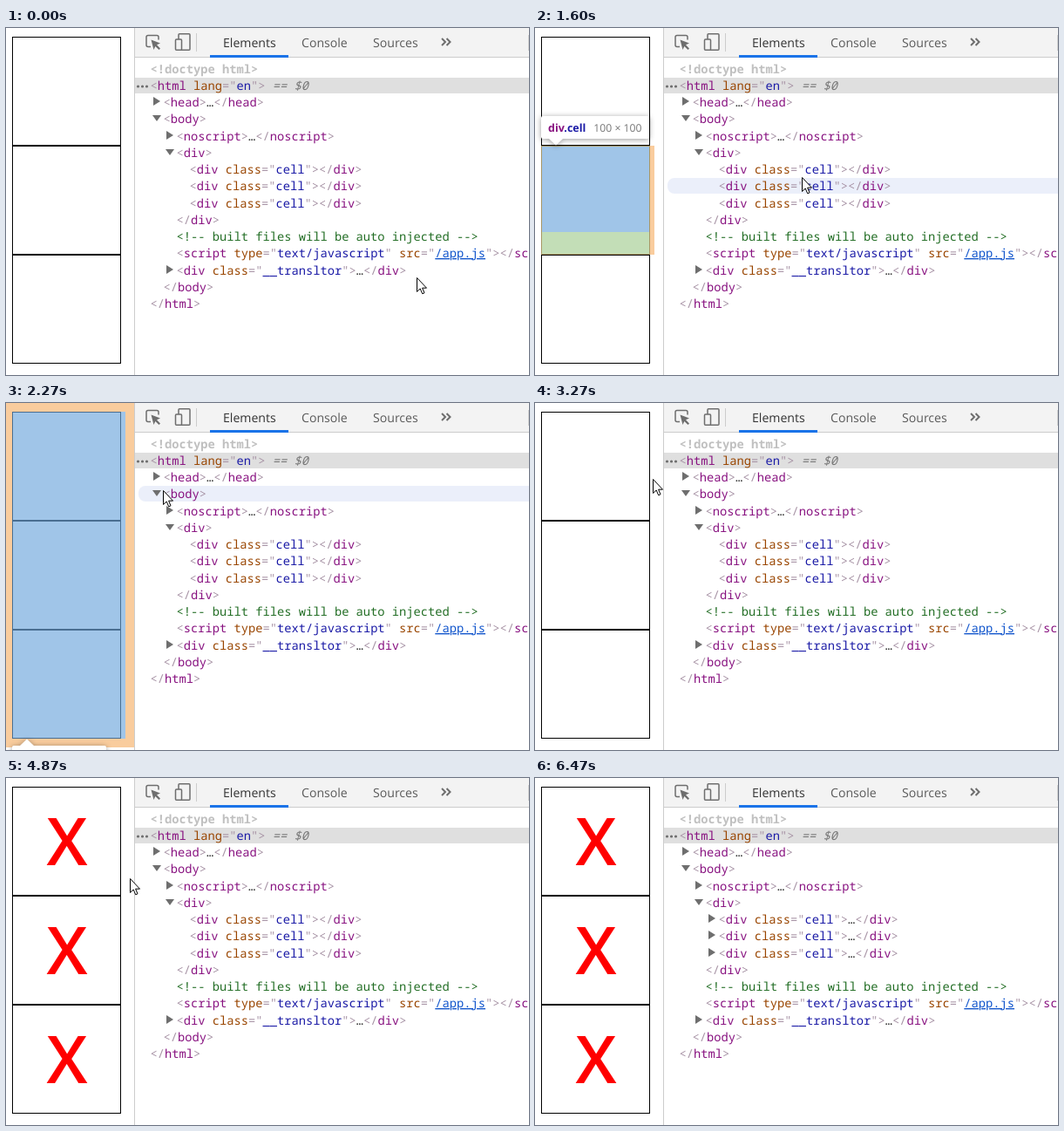
An HTML page that plays this animation: 600 by 398 pixels, repeating every 6670 ms.

```html
<!DOCTYPE html>
<html lang="en">
<head>
<meta charset="utf-8">
<title>Element inspector</title>
<style>
html, body { margin: 0; width: 100%; height: 100%; overflow: hidden; background: #fff; }
svg { display: block; width: 600px; height: 398px; }
text { white-space: pre; text-rendering: geometricPrecision; }
.code { font: 13.745px "Noto Sans Mono", monospace; fill: #a894a6; }
.doctype { fill: #c0c0c0; font-weight: 600; }
.tag { fill: #881280; }
.attr { fill: #994500; }
.val { fill: #1a1aa6; }
.dots { fill: #333; }
.note { fill: #236e25; }
.link { fill: #1155cc; text-decoration: underline; }
.ref { fill: #777; font-style: italic; }
.tab { font: 14.1px "Open Sans", sans-serif; fill: #5a5a5a; }
.tip { font: 12.2px "Open Sans", sans-serif; fill: #777; }
.tip .name { font-size: 12.5px; font-weight: 700; fill: #1a1aa6; }
.tip .name .tag { fill: #881280; }
.bubble { fill: #fff; filter: drop-shadow(0 1px 3px rgba(0, 0, 0, .4)); }
.mark { font: 600 75.6px "Open Sans", sans-serif; fill: #f00; text-anchor: middle; }
.content { fill: rgba(111, 168, 220, .66); }
.padding { fill: rgba(147, 196, 125, .55); }
.margin { fill: rgba(246, 178, 107, .66); }
.border { fill: none; stroke: rgba(255, 229, 153, .66); }
.icon { fill: none; stroke: #6e6e6e; stroke-width: 1.5; }
</style>
</head>
<body>
<svg id="stage" viewBox="0 0 600 398"></svg>
<script>
const FPS = 15, FRAMES = 100, LOOP = 6670;
const CELLS = [0, 1, 2], CELL_ROW = 6, PITCH = 19.25;
const rowTop = i => 38 + PITCH * i;

// frame, x, y of the pointer tip
const PATH = [
  [0, 471, 286], [17, 471, 286], [18, 466, 282], [20, 428, 256], [22, 365, 212],
  [23, 334, 190], [24, 306, 171], [26, 262, 142], [28, 232, 124], [29, 225, 120],
  [33, 190, 105], [36, 160, 91], [38, 147, 84], [48, 147, 84], [49, 135, 87],
  [52, 117, 86], [56, 95, 84], [57, 95, 84], [58, 95, 85], [67, 95, 85],
  [68, 98, 87], [73, 142, 115], [77, 153, 113], [78, 157, 118], [81, 172, 165],
  [83, 177, 222], [85, 175, 326], [88, 130, 382]
];
// frame, hovered row
const HOVER = [
  [0, -1], [5, 12], [18, 11], [21, 10], [22, 5], [23, 8], [24, 7], [25, 6], [26, 5],
  [28, 4], [31, 3], [35, 2], [37, -1], [79, 4], [80, 5], [81, 6], [82, 7], [83, 8],
  [84, 5], [86, 14], [88, -1]
];
const MARKS_AT = 63, UPDATE_AT = 79, POINTER_END = 89;

const span = (cls, t) => `<tspan class="${cls}">${t}</tspan>`;
const rect = (x, y, w, h, more = '') => `<rect x="${x}" y="${y}" width="${w}" height="${h}" ${more}/>`;
const attr = (name, val, cls = 'val') => ` ${span('attr', name)}="${span(cls, val)}"`;
const open = (name, attrs = '', cls = 'tag') => `&lt;${span(cls, name)}${attrs}&gt;`;
const close = name => `&lt;/${span('tag', name)}&gt;`;
const folded = (name, attrs = '') => open(name, attrs) + span('dots', '…') + close(name);
const cellLine = open('div', attr('class', 'cell'), 'tag flash') + span('dots kids', '') + close('div');

// indent, arrow (r = closed, d = open), markup
const ROWS = [
  [0, '', span('doctype', '&lt;!doctype html&gt;')],
  [0, '', open('html', attr('lang', 'en')) + span('ref', ' == $0')],
  [1, 'r', folded('head')],
  [1, 'd', open('body')],
  [2, 'r', folded('noscript')],
  [2, 'd', open('div')],
  ...CELLS.map(() => [3, 'r', cellLine]),
  [2, '', close('div')],
  [2, '', span('note', '&lt;!-- built files will be auto injected --&gt;')],
  [2, '', open('script', attr('type', 'text/javascript') + attr('src', '/app.js', 'link')) + close('script')],
  [2, 'r', folded('div', attr('class', '__transltor'))],
  [1, '', close('body')],
  [0, '', close('html')]
];

function rowMarkup([indent, arrow, line], i) {
  const x = 165.6 + 15 * indent, y = Math.round(rowTop(i) + 13.72), m = y - 6;
  const shape = arrow === 'r' ? `M${x - 11.6} ${m - 5}l8 5l-8 5z` : `M${x - 12.6} ${m - 3}h10l-5 7z`;
  const kind = i >= CELL_ROW && i < CELL_ROW + 3 ? 'class="late"' : '';
  return (arrow ? `<path ${kind} d="${shape}" fill="#6e6e6e"/>` : '') +
    `<text class="code" x="${x}" y="${y}">${line}</text>`;
}

// side: 1 = box above its anchor, -1 = below, 0 = no arrow
function tip(x, y, w, side, name, cls, size) {
  const ax = x + 17, edge = side > 0 ? y + 26 : y;
  const arrow = side ? `M${ax - 8} ${edge}L${ax} ${edge + 7.5 * side}L${ax + 8} ${edge}z` : '';
  return `<g class="bubble">${rect(x, y, w, 26, 'rx="2"')}<path d="${arrow}"/></g>
    <text class="tip" x="${x + 8}" y="${y + 17.5}"><tspan class="name">${span('tag', name)}${cls}</tspan>` +
    `<tspan dx="9">${size}</tspan></text>`;
}

function cellOverlay(i) {
  const y = 10 + 125 * i;
  return rect(7.5, y + .5, 124, 124, 'class="border"') + rect(8, y + 1, 123, 98, 'class="content"') +
    rect(8, y + 99, 123, 25, 'class="padding"') + rect(132, y, 5, 125, 'class="margin"') +
    tip(7, i ? y - 34 : y + 133, 124, i ? 1 : -1, 'div', '.cell', '100 × 100');
}

const block = rect(7, 10, 130, 375, 'class="content"');
const OVERLAYS = {
  3: block + '<path class="margin" fill-rule="evenodd" d="M0 0H147V395H0zM7 10V385H137V10z"/>' +
    tip(7, 393, 108, -1, 'body', '', '104 × 300'),
  5: block + tip(7, 393, 100, -1, 'div', '', '104 × 300'),
  12: tip(2, 8, 142, 0, 'div', '.__transltor', '0 × 0')
};
CELLS.forEach(i => { OVERLAYS[CELL_ROW + i] = cellOverlay(i); });

const toolbar = rect(148, 0, 452, 33, 'fill="#f3f3f3"') + rect(148, 33, 452, 1, 'fill="#ccc"') +
  rect(234, 31, 90, 3, 'fill="#1a73e8"') + rect(218, 6, 1, 21, 'fill="#ccc"') +
  rect(599, 8, 1, 18, 'fill="#ccc"') +
  `<path class="icon" d="M166 21.5h-3q-2 0-2-2v-9q0-2 2-2h10q2 0 2 2v3"/>
   <path d="M166.500 13.500l10.500 4-4 1.800 4 4.200-1.500 1.500-4.200-4-1.800 4z" fill="#6e6e6e"/>
   <rect class="icon" x="198" y="6.8" width="13" height="18.4" rx="1"/>
   <rect class="icon" x="194.5" y="13" width="7" height="12.2" rx="1" style="fill:#f3f3f3"/>
   <path class="icon" d="M500 12l4 4-4 4M505.5 12l4 4-4 4" style="stroke-width:2"/>
   <text class="tab" x="249" y="21.5" style="fill:#333">Elements</text>
   <text class="tab" x="339" y="21.5">Console</text>
   <text class="tab" x="421" y="21.5">Sources</text>`;

const stage = document.getElementById('stage');
stage.innerHTML =
  CELLS.map(i => rect(7.5, 10.5 + 125 * i, 124, 124, 'fill="none" stroke="#000"')).join('') +
  `<g id="marks">${CELLS.map(i => `<text class="mark" x="70" y="${100 + 125 * i}">X</text>`).join('')}</g>` +
  Object.keys(OVERLAYS).map(r => `<g class="overlay" data-row="${r}">${OVERLAYS[r]}</g>`).join('') +
  rect(147, 0, 453, 398, 'fill="#fff"') + rect(147, 0, 1, 398, 'fill="#ccc"') + toolbar +
  rect(148, 57, 452, 18, 'fill="#dfdfdf"') +
  [151.5, 156.5, 161.5].map(x => `<circle cx="${x}" cy="67" r="1.6" fill="#6e6e6e"/>`).join('') +
  rect(152, 0, 460, 18, 'id="hover" rx="8" fill="#ebeffa"') +
  rect(187, 153, 1, 76, 'id="guide" fill="#ddd"') +
  `<g id="glow" fill="#a539a5">${CELLS.map(i => rect(218, rowTop(CELL_ROW + i), 24.5, 18, 'rx="2"')).join('')}</g>` +
  ROWS.map(rowMarkup).join('') +
  `<path id="pointer" d="M.5 .5V16.5L4.2 13L6.7 18.8L9 17.8L6.6 12.2H11.5z" fill="#fff" stroke="#000"/>`;

const get = id => document.getElementById(id);
const all = cls => [...stage.querySelectorAll('.' + cls)];
const show = (el, on) => { el.style.display = on ? '' : 'none'; };
const marks = get('marks'), hover = get('hover'), guide = get('guide'), glow = get('glow'), pointer = get('pointer');
const overlays = all('overlay'), late = all('late'), kids = all('kids'), flash = all('flash');

function pointerAt(k) {
  const n = PATH.findIndex(p => p[0] > k);
  if (n < 0) return PATH[PATH.length - 1].slice(1);
  const [a, ax, ay] = PATH[n - 1], [b, bx, by] = PATH[n], u = (k - a) / (b - a);
  return [Math.round(ax + (bx - ax) * u), Math.round(ay + (by - ay) * u)];
}

// strength of the highlight after the tree updates
function glowAt(k) {
  if (k < UPDATE_AT || k >= 97) return 0;
  const held = k > 89 && k < 94 ? 89 : k;
  return (1 - Math.max(0, held - 79.4) / 21) ** 3;
}

function mixTag(a) {
  const w = (1 - a) ** 1.6;
  return `rgb(${[136, 18, 128].map(c => Math.round(255 + (c - 255) * w))})`;
}

function draw(k) {
  const row = HOVER.filter(h => h[0] <= k).pop()[1];
  const updated = k >= UPDATE_AT, a = glowAt(k);
  show(marks, k >= MARKS_AT);
  show(hover, row >= 0);
  hover.setAttribute('y', Math.floor(rowTop(Math.max(row, 0))));
  show(guide, row === 5);
  overlays.forEach(o => show(o, +o.dataset.row === row && k !== 5));
  late.forEach(el => show(el, updated));
  kids.forEach(el => { el.textContent = updated ? '…' : ''; });
  glow.setAttribute('opacity', a);
  flash.forEach(el => { el.style.fill = a ? mixTag(a) : ''; });
  show(pointer, k < POINTER_END);
  pointer.setAttribute('transform', `translate(${pointerAt(k)})`);
}

const start = performance.now();
let last = -1;
function tick() {
  const t = (performance.now() - start) % LOOP;
  const k = Math.min(FRAMES - 1, Math.floor((t + 4) * FPS / 1000));
  if (k !== last) draw(last = k);
  requestAnimationFrame(tick);
}
tick();
</script>
</body>
</html>
```
